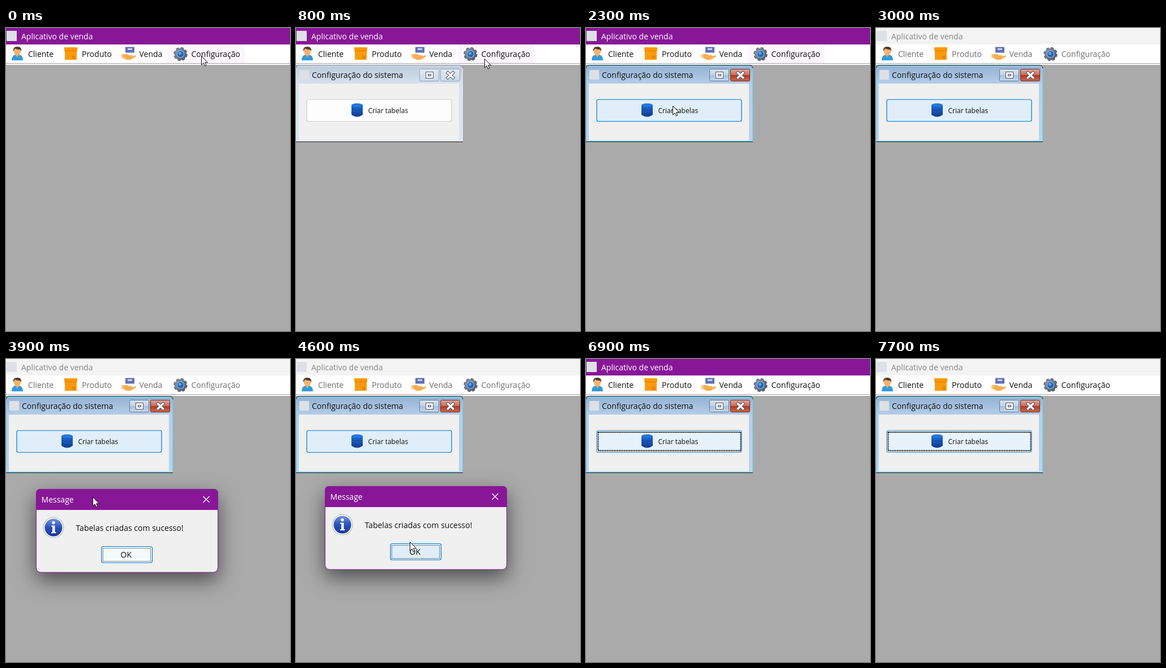
Write an HTML page that moves like this. It is 502 px wide and 534 px high and loops after 7.8 s.

```html
<!DOCTYPE html>
<html lang="pt-BR">
<head>
<meta charset="utf-8">
<title>Aplicativo de venda</title>
<style>
  html, body { margin: 0; width: 100%; height: 100%; overflow: hidden; background: #aaa; }
  svg { display: block; width: 502px; height: 534px; }
  text { font: 14px "Open Sans", "Noto Sans", sans-serif; white-space: pre; }
  .small { font-size: 12px; }
  .shadow { filter: drop-shadow(0 14px 18px rgba(0, 0, 0, .55)); }
</style>
</head>
<body>
<svg viewBox="0 0 502 534">
  <defs>
    <linearGradient id="frameOn" x2="0" y2="1">
      <stop stop-color="#94b1d3"/><stop offset=".25" stop-color="#b5cee9"/><stop offset="1" stop-color="#b9d4ef"/>
    </linearGradient>
    <linearGradient id="frameOff" x2="0" y2="1">
      <stop stop-color="#bccada"/><stop offset=".25" stop-color="#d6e2ef"/><stop offset="1" stop-color="#d9e5f2"/>
    </linearGradient>
    <linearGradient id="glass" x2="0" y2="1">
      <stop stop-color="#d5e2f0"/><stop offset=".48" stop-color="#c2d3e6"/>
      <stop offset=".5" stop-color="#a9bfd8"/><stop offset="1" stop-color="#c3d7ec"/>
    </linearGradient>
    <linearGradient id="pale" x2="0" y2="1">
      <stop stop-color="#e2eaf3"/><stop offset="1" stop-color="#ccdae9"/>
    </linearGradient>
    <linearGradient id="red" x2="0" y2="1">
      <stop stop-color="#e2a99d"/><stop offset=".48" stop-color="#cc6b58"/>
      <stop offset=".5" stop-color="#b5341f"/><stop offset="1" stop-color="#cf6a4c"/>
    </linearGradient>
    <linearGradient id="drum" x2="0" y2="1">
      <stop stop-color="#1d68cf"/><stop offset=".5" stop-color="#1955b5"/><stop offset="1" stop-color="#113b8c"/>
    </linearGradient>
    <linearGradient id="ball" x2="0" y2="1">
      <stop stop-color="#6f93e0"/><stop offset=".5" stop-color="#2a50b8"/><stop offset="1" stop-color="#1c379a"/>
    </linearGradient>
    <linearGradient id="steel" x2="1" y2="1">
      <stop stop-color="#8d99a8"/><stop offset="1" stop-color="#475261"/>
    </linearGradient>
  </defs>

  <rect width="502" height="534" fill="#aaa"/>

  <!-- main window -->
  <rect y="28" width="502" height="37" fill="#fff"/>
  <rect id="bar" width="502" height="29"/>
  <rect x="1" y="5" width="18" height="18" fill="#dde1e5"/>
  <text id="barText" x="27" y="19.5">Aplicativo de venda</text>
  <rect id="hot" x="286" y="29" width="136" height="33" fill="#fbf6fb"/>
  <path d="M0 62.5H502" stroke="#a0a0a0"/>

  <g id="person">
    <path d="M10 57q0-9 7-10h6q7 1 7 10z" fill="#2f9be0"/>
    <path d="M16 46h8l-4 6z" fill="#f0a45c"/>
    <ellipse cx="20" cy="41" rx="6" ry="7" fill="#f7b169"/>
    <path d="M13 41q-1-8 6-8q9-1 8 8l-2-3q-6 0-9-2z" fill="#4b3b36"/>
  </g>
  <g id="box">
    <path d="M104 39h21v17h-21z" fill="#fb9a0c"/>
    <path d="M103 34h23v6h-23z" fill="#ff9800"/>
    <path d="M104 40.5h21" stroke="#d67c00"/>
    <path d="M117 50h5M117 53h5" stroke="#9a5b0c" stroke-dasharray="2 1"/>
  </g>
  <g id="sale">
    <path d="M211 33.500h16v10h-16z" fill="#5f70b5"/>
    <path d="M215 36h8v2.500h-8z" fill="#dfe5f7"/>
    <path d="M204 46h10l4 2h5q2 2-1 3h-5 5l6-3q3 1 1 3l-9 5h-7l-5-3h-4z" fill="#f8ad50"/>
    <path d="M204 46h4v7h-4z" fill="#f6c483"/>
  </g>
  <g id="gear" transform="translate(308.5 46)">
    <circle r="10.500" fill="none" stroke="#5a6675" stroke-width="3.500" stroke-dasharray="5 3.247"/>
    <circle r="10.600" fill="url(#steel)"/>
    <circle r="6.700" fill="#b4c2d3"/>
    <circle r="5.700" fill="#2067c4"/>
    <circle cx="-1" cy="-1.500" r="2.600" fill="#5fa3ec"/>
  </g>
  <g id="menu">
    <text x="39" y="51">Cliente</text>
    <text x="134" y="51">Produto</text>
    <text x="235.5" y="51">Venda</text>
    <text x="327.5" y="51">Configuração</text>
  </g>

  <!-- inner window -->
  <g id="win">
    <path id="frame" d="M0 201V71q0-6 6-6H289q6 0 6 6V201z"/>
    <path id="edge" d="M.5 199.500H294.500V72q0-5-5-5.500H6q-5.500.5-5.500 5.500z" fill="none"/>
    <path id="rim" d="M0 71q1-5.500 6-5.500H289q5 0 6 5.500" fill="none"/>
    <path d="M0 200.500H295" stroke="#222"/>
    <rect x="5" y="98" width="283" height="100" fill="#f0f0f0"/>
    <rect x="6" y="74" width="17" height="17" fill="#dde1e5"/>
    <text x="28" y="87.500" fill="#111">Configuração do sistema</text>
    <rect id="max" x="218.500" y="72.500" width="34" height="21" rx="2"/>
    <rect x="229.500" y="77.500" width="13" height="11" fill="#fff" stroke="#4d5668"/>
    <rect x="233.500" y="81.500" width="5" height="3" fill="#c2d3e6" stroke="#4d5668"/>
    <rect id="close" x="255.500" y="72.500" width="34" height="21" rx="2"/>
    <g fill="none" stroke-linecap="square">
      <path d="M268.500 79l9 8.500M277.500 79l-9 8.500" stroke="#4d5668" stroke-width="5.500"/>
      <path d="M268.500 79l9 8.500M277.500 79l-9 8.500" stroke="#fff" stroke-width="3.500"/>
    </g>
    <rect id="btn" x="19" y="126" width="256" height="38.500" rx="3" stroke-width="1.200"/>
    <rect id="focus" x="21.500" y="129" width="252" height="32.500" fill="none" stroke="#111" stroke-width="1.800" stroke-dasharray="2 1"/>
    <path d="M98 136v17q10 7 20 0v-17z" fill="url(#drum)"/>
    <path d="M98 142.500q10 5 20 0M98 149q10 5 20 0" fill="none" stroke="#124294" stroke-width=".8"/>
    <ellipse cx="108" cy="136" rx="10" ry="3.300" fill="#2676d8"/>
    <text class="small" x="127.500" y="149.500" fill="#111">Criar tabelas</text>
  </g>

  <!-- message -->
  <g id="dlg">
    <rect class="shadow" width="322" height="147" rx="8" fill="#881798"/>
    <rect x=".5" y=".5" width="321" height="146.500" rx="8" fill="#f0f0f0" stroke="#881798"/>
    <path d="M0 37V8q0-8 8-8H314q8 0 8 8V37z" fill="#881798"/>
    <text x="9.500" y="24" fill="#fff">Message</text>
    <path d="M295.500 13l11 11M306.500 13l-11 11" stroke="#fff" stroke-width="1.200"/>
    <circle cx="31" cy="68" r="18.500" fill="#aeb3bd"/>
    <circle cx="31" cy="68" r="17.500" fill="#f4f5f8"/>
    <circle cx="31" cy="68" r="15.500" fill="url(#ball)"/>
    <circle cx="31" cy="59.500" r="2.700" fill="#fff"/>
    <path d="M27 64.500h6.500v11.500h2v2H27v-2h2v-9.500h-2z" fill="#fff"/>
    <text x="70.500" y="74" fill="#111">Tabelas criadas com sucesso!</text>
    <rect id="ok" x="116" y="101.500" width="89.500" height="28.500" rx="3" stroke="#0078d4" stroke-width="1.200"/>
    <rect x="118.500" y="104.500" width="84" height="23" fill="none" stroke="#222" stroke-dasharray="1 1"/>
    <text x="149.500" y="121" fill="#111">OK</text>
  </g>

  <path id="cursor" d="M.5.500V16l3.600-3.300L6.500 18l2.400-1L6.600 11.800h4.900z" fill="#fff" stroke="#111" stroke-linejoin="round"/>
</svg>
<script>
const LOOP = 7800, STEP = 100;
const $ = id => document.getElementById(id);
const set = (id, attrs) => { for (const k in attrs) $(id).setAttribute(k, attrs[k]); };
const show = (id, on) => set(id, { visibility: on ? 'visible' : 'hidden' });
const within = (t, a, b) => t >= a && t < b;

// rows of [time, ...values]
const POINTER = [
  [0, 345, 49], [300, 345, 49], [500, 341, 50], [700, 341, 50], [1500, 153, 135],
  [2100, 153, 135], [2400, 153, 138], [3800, 153, 243], [3900, 153, 243],
  [4200, 151, 238], [4600, 201, 322], [5000, 206, 340], [5100, 206, 340], [5200, 209, 342]
];
const DIALOG = [[3900, 53, 229], [4200, 51, 224]];
const GLOW = [[1400, 0], [2000, 1], [5800, 1], [6500, .7], [6900, .8], [7200, 1], [7600, .72]];
const OK_GLOW = [[4300, .3], [4600, 1]];

function at(rows, t) {
  const i = rows.findIndex(r => r[0] > t);
  if (i === 0) return rows[0].slice(1);
  if (i < 0) return rows[rows.length - 1].slice(1);
  const a = rows[i - 1], b = rows[i];
  const p = (t - a[0]) / (b[0] - a[0]);
  const e = p * p * (3 - 2 * p);
  return a.slice(1).map((v, k) => v + (b[k + 1] - v) * e);
}

const mix = (a, b, p) => `rgb(${a.map((v, i) => Math.round(v + (b[i] - v) * p))})`;
const fillOf = p => mix([253, 253, 253], [224, 238, 249], p);
const edgeOf = p => mix([208, 208, 208], [0, 120, 212], p);
const move = (id, [x, y]) => set(id, { transform: `translate(${Math.round(x)} ${Math.round(y)})` });

function draw(t) {
  const barOn = t < 2400 || within(t, 5800, 7700);
  const winOn = t >= 2000;
  const [glow] = at(GLOW, t);

  set('bar', { fill: barOn ? '#881798' : '#f3f3f3' });
  set('barText', { fill: barOn ? '#fff' : '#868686' });
  set('menu', { fill: within(t, 2400, 5800) ? '#6d6d6d' : '#111' });
  show('hot', t < 2400);

  set('win', { display: t >= 400 ? 'inline' : 'none' });
  set('frame', { fill: winOn ? 'url(#frameOn)' : 'url(#frameOff)' });
  set('rim', { stroke: winOn ? '#222' : '#6b7480' });
  set('edge', { stroke: winOn ? '#5fdcf8' : '#e8f0f8' });
  set('max', { fill: winOn ? 'url(#glass)' : 'url(#pale)', stroke: winOn ? '#65788f' : '#98a5b5' });
  set('close', { fill: winOn ? 'url(#red)' : 'url(#pale)', stroke: winOn ? '#6b2a22' : '#98a5b5' });
  set('btn', { fill: fillOf(glow), stroke: edgeOf(glow) });
  show('focus', t >= 5800);

  set('dlg', { display: within(t, 3800, 5800) ? 'inline' : 'none' });
  move('dlg', at(DIALOG, t));
  set('ok', { fill: fillOf(at(OK_GLOW, t)[0]) });

  show('cursor', t < 2500 || within(t, 3800, 6000));
  move('cursor', at(POINTER, t));
}

const start = performance.now();
function tick() {
  const t = (performance.now() - start) % LOOP;
  draw(Math.floor(t / STEP) * STEP);
  requestAnimationFrame(tick);
}
tick();
</script>
</body>
</html>
```
